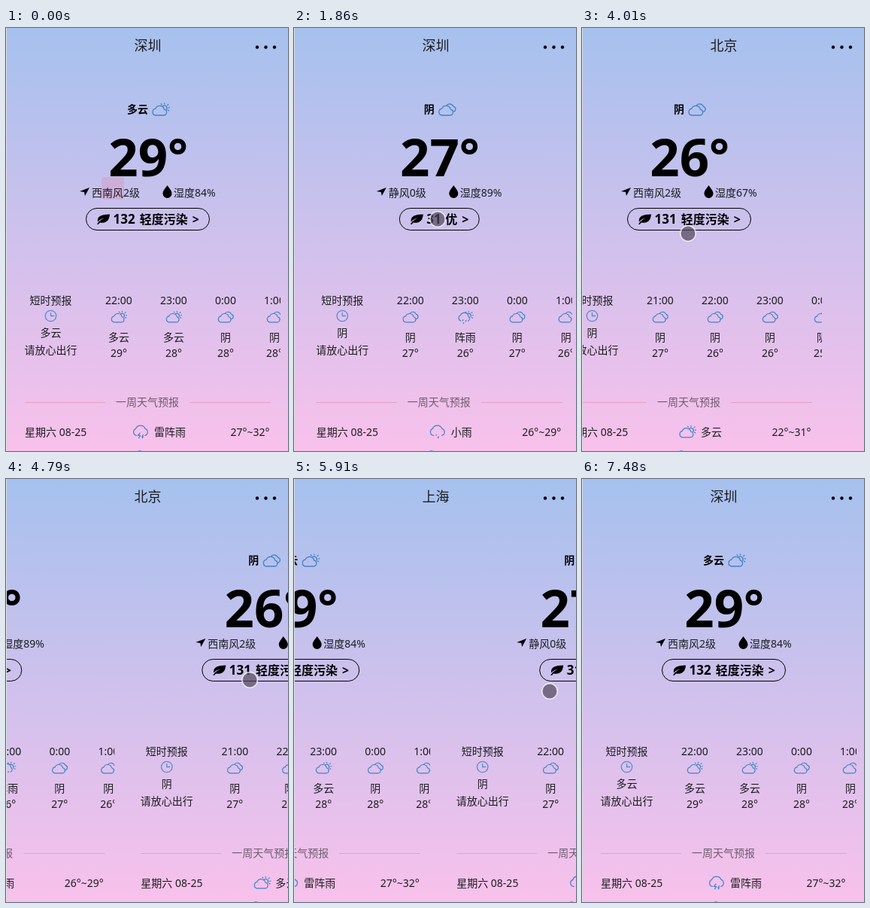
Animation, 375 px wide and 562 px high, one loop 7.97 s. Source, as an HTML page:

```html
<!DOCTYPE html>
<html lang="zh-CN">
<head>
<meta charset="utf-8">
<style>
html, body { margin: 0; width: 100%; height: 100%; overflow: hidden; }
svg { display: block; width: 375px; height: 562px; }
text { font: 14px "Noto Sans", "Open Sans", "Noto Sans CJK SC", "Noto Sans CJK", sans-serif; fill: #1c1c20; }
.b { font-weight: 700; fill: #000; }
.m { text-anchor: middle; }
.icon { fill: none; stroke: #4183c8; stroke-width: 1.3; stroke-linecap: round; stroke-linejoin: round; }
</style>
</head>
<body>
<svg viewBox="0 0 375 562">
  <defs>
    <linearGradient id="sky" x2="0" y2="1">
      <stop stop-color="#a6c1ee"/><stop offset="1" stop-color="#f8c1eb"/>
    </linearGradient>
    <clipPath id="hours"><rect y="340" width="365" height="110"/></clipPath>
  </defs>
  <rect width="375" height="562" fill="url(#sky)"/>
  <rect id="badge" x="127" y="198" width="30" height="30" rx="4" fill="#e678a0" opacity=".25"/>
  <g id="pages"></g>
  <rect width="1" height="562" fill="#dcdde4"/>
  <text id="title" class="m" x="188.5" y="30" style="font-size:18px"></text>
  <circle cx="334" cy="25.5" r="2.2"/><circle cx="345.5" cy="25.5" r="2.2"/><circle cx="357" cy="25.5" r="2.2"/>
  <circle id="pointer" r="10.2" fill="#50465a" fill-opacity=".7" stroke="#fff" stroke-opacity=".75" stroke-width="1.6"/>
</svg>
<script>
const $ = id => document.getElementById(id);
const LOOP = 7970, WIDTH = 375;

const cities = [
  { sky: '多云', temp: 29, wind: '西南风2级', wet: 84, aqi: 132, air: '轻度污染', day: '雷阵雨', range: '27°~32°',
    hours: [['22:00', '多云', 29], ['23:00', '多云', 28], ['0:00', '阴', 28], ['1:00', '阴', 28]] },
  { sky: '阴', temp: 27, wind: '静风0级', wet: 89, aqi: 31, air: '优', day: '小雨', range: '26°~29°',
    hours: [['22:00', '阴', 27], ['23:00', '阵雨', 26], ['0:00', '阴', 27], ['1:00', '阴', 26]] },
  { sky: '阴', temp: 26, wind: '西南风2级', wet: 67, aqi: 131, air: '轻度污染', day: '多云', range: '22°~31°',
    hours: [['21:00', '阴', 27], ['22:00', '阴', 26], ['23:00', '阴', 26], ['0:00', '阴', 25]] }
];

// Weather icons in a 25 x 17 box
const cloud = 'M5.5 16.5h11.5a4 4 0 0 0 .4-7.9 6 5.6 0 0 0-11.6-.9 4.5 4.5 0 0 0-.3 8.8z';
const sun = 'M15.5 4.1a3.6 3.6 0 0 1 5.2 4.6M17.7 1.4V.3M14 2.2l-.9-.9M21.8 3l1.1-1.1M23.2 6.4h1.3M22.4 9.6l1.2.7';
const open = 'M7 14a4.9 4.9 0 0 1-1.2-9.4 6.8 6.5 0 0 1 13 0 4.9 4.9 0 0 1-.3 9.4';
const icons = {
  '多云': cloud + sun,
  '阴': cloud + 'M12.3 3.2a5.2 4.8 0 0 1 9 1.6 3.6 3.6 0 0 1-.5 7.1',
  '阵雨': 'M6 14.5a4.5 4.5 0 0 1-.2-8.3 6 5.6 0 0 1 11.6 1.6 4 4 0 0 1-.4 6.9' + sun + 'M9.5 13l-.7 1.3M14 14l-.7 1.3M10.5 17.3l-.7 1.3',
  '小雨': open + 'M11 13l-.4.8M14 15.5l-.8 1.4.4.3.4-1.7',
  '雷阵雨': open + 'M11.500 10.5l-2.500 3.500h3l-2 3.500M16 13l-1.500 2.500h1.500l-1 2'
};

const text = (x, y, s, cls = '', size = 14) =>
  `<text x="${x}" y="${y}" class="${cls}" style="font-size:${size}px">${s}</text>`;
const shape = (x, y, d, attrs = '', k = 1) =>
  `<path transform="translate(${x} ${y}) scale(${k})" d="${d}" ${attrs}/>`;
const icon = (name, x, y, k) => shape(x, y, icons[name], 'class="icon"', k);

function header(c) {
  const x = 189 - (14 * c.sky.length + 28) / 2;
  const windWidth = 14 * c.wind.length - 6;
  const wx = 189 - (118 + windWidth) / 2, dx = wx + 46 + windWidth;
  return text(x, 113, c.sky, 'b') + icon(c.sky, x + 14 * c.sky.length + 4, 99.5, 1) +
    text(189, 197, c.temp + '<tspan dy="-5" font-size="62">°</tspan>', 'b m', 69) +
    shape(wx, 212, 'M0 5L13 0 7 11 6 6z') + text(wx + 16, 224, c.wind) +
    shape(dx, 209, 'M6.5 0C9 4 12.5 7 12.5 11a6 6 0 0 1-12 0C.5 7 4 4 6.5 0z') +
    text(dx + 15, 224, `湿度${c.wet}%`);
}

function airPill(c) {
  const airX = 40.4 + 10.3 * String(c.aqi).length;
  const moreX = airX + 16 * c.air.length + 6, w = Math.round(moreX + 23);
  return `<g transform="translate(${Math.floor(188 - w / 2) + .5} 239.5)">
    <rect width="${w}" height="29" rx="14.5" fill="none" stroke="#000"/>` +
    shape(14.5, 8, 'M0 13Q4 7 10 5 4 6 1 10-1 0 17 0 16 13 4 11L1.5 13.5z') +
    text(36, 20.5, c.aqi, 'b', 17) + text(airX, 20.5, c.air, 'b', 16) +
    text(moreX, 20.5, '&gt;', 'b', 16) + '</g>';
}

function hourly(c) {
  let x = 132;
  const columns = c.hours.map(([time, sky, temp]) => {
    const w = 8 * time.length - 4, mid = x + w / 2;
    x += w + 37;
    return text(mid, 367, time, 'm') + icon(sky, mid - 11.5, 376, .9) +
      text(mid, 416, sky, 'm') + text(mid, 437, temp + '°', 'm');
  });
  return '<g clip-path="url(#hours)">' + text(59.5, 367, '短时预报', 'm') +
    shape(59.5, 382.5, 'M-7.2 0a7.2 7.2 0 1 0 14.4 0a7.2 7.2 0 1 0-14.4 0M0-4V0H4', 'class="icon" opacity=".85"') +
    text(59.5, 410, c.sky, 'm') + text(59.5, 433, '请放心出行', 'm') + columns.join('') + '</g>';
}

function weekly(c) {
  const x = 203 - (30 + 14 * c.day.length) / 2;
  return shape(0, 497.5, 'M25 0H132M244 0H352', 'stroke="#e5a0c4"') +
    `<g opacity=".6">${text(188, 502, '一周天气预报', 'm')}</g>` +
    text(25, 542, '星期六 08-25') + icon(c.day, x, 528, .96) +
    text(x + 30, 542, c.day) + text(324.5, 542, c.range, 'm') +
    shape(174, 563.5, 'M0 0q4-3 8 0', 'class="icon"');
}

$('pages').innerHTML = cities.map((c, i) =>
  `<g transform="translate(${i * WIDTH})">${header(c) + airPill(c) + hourly(c) + weekly(c)}</g>`).join('');

const smooth = p => p * p * (3 - 2 * p);
const settle = p => 1 - (1 - p) ** 3;
const linear = p => p;

// Keys are [time, easing into this key, ...values]
function sample(keys, t) {
  const i = keys.findIndex(k => k[0] > t);
  if (i < 0) return keys[keys.length - 1].slice(2);
  if (i === 0) return keys[0].slice(2);
  const a = keys[i - 1], b = keys[i];
  const p = b[1]((t - a[0]) / (b[0] - a[0]));
  return a.slice(2).map((v, j) => v + (b[j + 2] - v) * p);
}

const scroll = [
  [1200, linear, 0], [1505, smooth, -175], [2005, settle, -375],
  [2420, linear, -375], [2580, smooth, -525], [3060, settle, -750],
  [3230, linear, -750], [4010, smooth, -796], [4350, smooth, -750],
  [4790, smooth, -596], [4840, linear, -580], [5300, settle, -375],
  [5660, linear, -375], [5910, smooth, -185], [6370, settle, 0]
];
const touch = [
  [810, linear, 350, 575], [1200, smooth, 300, 280], [1505, smooth, 125, 262],
  [1860, smooth, 191, 254], [2300, smooth, 300, 262], [2420, linear, 300, 262],
  [2580, smooth, 150, 256], [2990, smooth, 251, 254], [3080, linear, 265, 256],
  [3230, linear, 265, 256], [4010, smooth, 141, 273], [4350, smooth, 170, 270],
  [4790, smooth, 324, 267], [4840, linear, 334, 267], [5300, smooth, 160, 280],
  [5660, smooth, 150, 282], [5910, smooth, 340, 282], [6460, smooth, 112, 209],
  [6850, linear, 290, 300], [7240, linear, 349, 507], [7480, linear, 350, 575]
];
const titles = [[0, '深圳'], [2005, '上海'], [3060, '北京'], [5300, '上海'], [6370, '深圳']];

function draw(now) {
  const t = now % LOOP;
  $('pages').setAttribute('transform', `translate(${sample(scroll, t)})`);
  $('pointer').setAttribute('transform', `translate(${sample(touch, t)})`);
  $('title').textContent = titles.filter(k => k[0] <= t).pop()[1];
  $('badge').style.display = t < 810 ? '' : 'none';
}

const start = performance.now();
function tick() {
  draw(performance.now() - start);
  requestAnimationFrame(tick);
}
tick();
</script>
</body>
</html>
```
